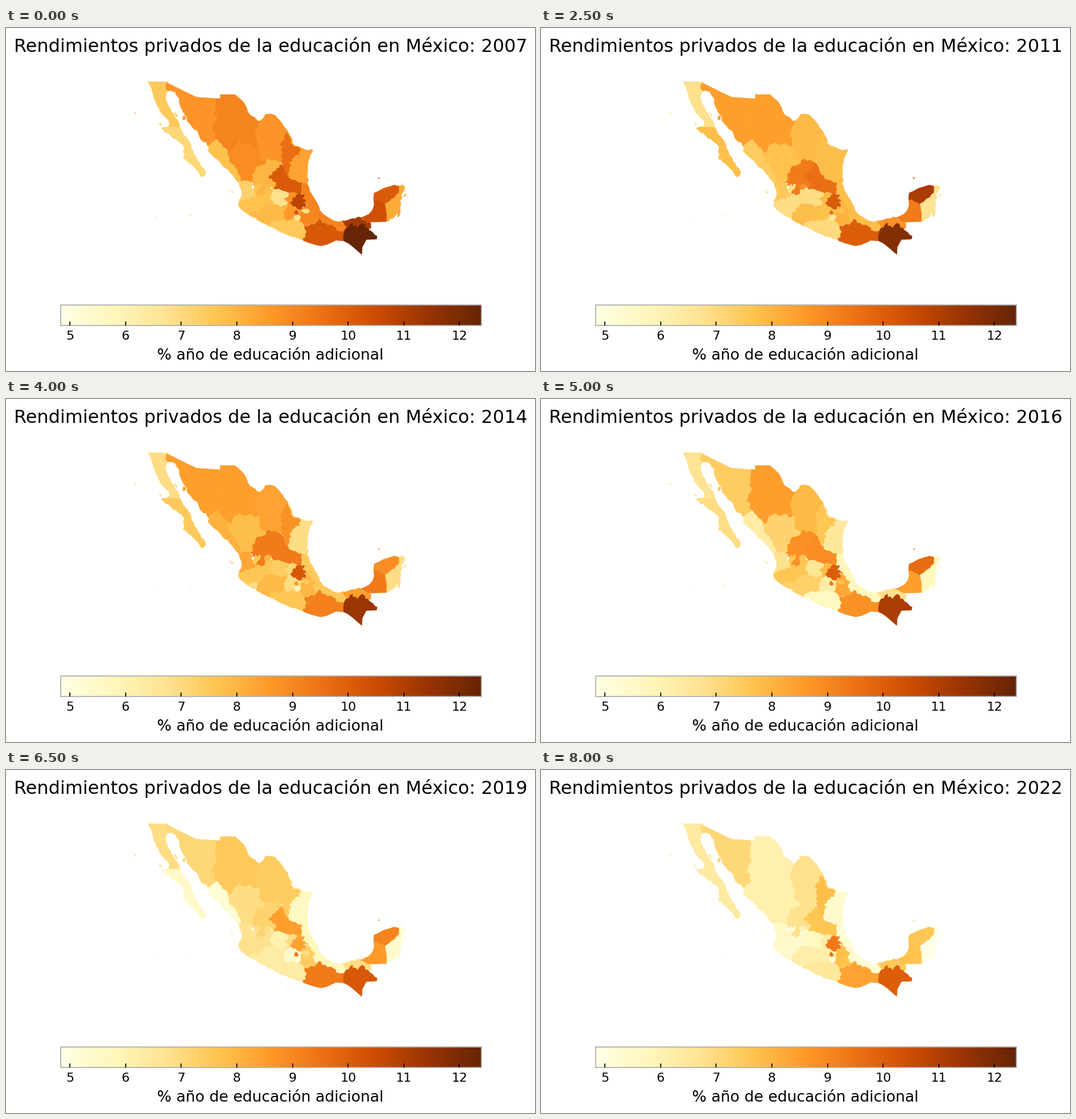
A matplotlib script that plays this animation: 928 by 603 pixels, repeating every 8500 ms.

```python
import numpy as np
import matplotlib
import matplotlib.pyplot as plt
from matplotlib.animation import FuncAnimation
from matplotlib.patches import Polygon, Rectangle

W, H, DPI = 928, 603, 64
VMIN, VMAX = 4.83, 12.39
YEARS = [2007, 2009, 2011, 2014, 2016, 2019, 2022]
CMAP = matplotlib.colormaps["YlOrBr"]

plt.rcParams["font.family"] = "DejaVu Sans"
fig = plt.figure(figsize=(W / DPI, H / DPI), dpi=DPI, facecolor="white")
ax = fig.add_axes([0, 0, 1, 1])
ax.axis("off")

states = []


def px(size):
    return size * 72 / DPI


def state(values, *rings):
    """Add a state: its rate in each of YEARS and its rings as x, y pairs."""
    parts = []
    for ring in rings:
        part = Polygon(np.reshape(ring, (-1, 2)), closed=True, lw=px(0.7),
                       joinstyle="round")
        parts.append(ax.add_patch(part))
    states.append((values, parts))


def dot(x, y, w, h):
    return [x - w, y, x, y - h, x + w, y, x, y + h]


# Baja California
state([7.5, 7.3, 6.8, 6.9, 6.7, 6.9, 6.4],
      [249.5, 94.5, 284, 94.5, 284, 97, 281, 99, 280, 105, 283, 111, 281, 116,
       279.5, 123, 282, 130, 285, 137, 288, 141, 290, 147, 294, 152, 297, 158,
       301, 162, 304, 168, 305, 175, 285, 173.5, 287, 168, 285, 162, 279, 157,
       274, 151, 270, 146, 268, 140, 264, 134, 262, 128, 259, 122, 258, 115,
       256, 111, 255, 105, 252, 100],
      [295, 148, 298, 150, 301, 156, 298, 155],
      [269.5, 166, 272, 169, 273, 171, 270, 170],
      dot(227, 150, 0.8, 1.8))

# Baja California Sur
state([7.1, 6.8, 7.8, 7.5, 6.9, 5.5, 6.4],
      [272, 176, 278, 174, 285, 174, 305, 175, 309, 182, 311, 187, 317, 193,
       322, 200, 325, 207, 325, 212, 329, 217, 330, 223, 334, 227, 337, 234,
       341, 238, 342, 243, 347, 247, 350, 253, 350, 257, 345, 262, 341, 260,
       339, 255, 335, 250, 329, 244, 324, 239, 318, 235, 316, 231, 311, 230,
       313, 222, 311, 216, 313, 210, 309, 204, 303, 200, 298, 195, 293, 194,
       289, 189, 285, 185, 280, 184, 276, 179])

# Sonora
state([8.7, 8.0, 8.5, 8.5, 7.4, 7.1, 7.1],
      [281, 98, 284, 97, 310, 110, 334, 121.5, 368, 124, 371, 140, 369, 160,
       366, 178, 370, 190, 370, 197, 362, 201, 357, 206, 353, 206, 352, 201,
       346, 200, 341, 195, 338, 187, 336, 181, 329, 177, 324, 170, 318, 164,
       317, 156, 312, 150, 309, 144, 306, 138, 304, 131, 304, 124, 299, 118,
       297, 113, 292, 111, 287, 110, 284, 111, 280, 106],
      [312, 154, 315, 156, 315, 160, 311, 162, 310, 158])

# Coahuila
state([8.7, 8.9, 7.9, 8.4, 7.9, 7.4, 6.8],
      [445, 164, 452, 158, 455, 152, 463, 151, 471, 153, 477, 159, 484, 167,
       488, 174, 494, 181, 496, 186, 493, 195, 487, 205, 486, 220, 486, 233,
       478, 238, 467, 236, 458, 236, 450, 234, 445, 229, 442, 222, 443, 212,
       436, 200, 435, 185, 438, 172])

# Durango
state([8.9, 8.4, 7.7, 7.8, 7.2, 6.9, 6.1],
      [389, 217, 395, 212, 402, 203, 437, 201, 441, 204, 445, 209, 443, 213,
       446, 218, 443, 222, 446, 228, 450, 231, 457, 234, 456, 240, 449, 245,
       441, 248, 438, 256, 435, 264, 432, 270, 428, 272, 420, 270, 411, 272,
       408, 262, 404, 256, 403, 249, 397, 243, 391, 237, 389, 230, 387, 222])

# Chihuahua
state([9.1, 8.9, 8.5, 8.5, 8.5, 7.5, 6.1],
      [368, 124, 376, 124, 376, 117, 402, 117, 406, 121, 412, 126, 417, 131,
       422, 140, 424, 147, 428, 153, 437, 158, 441, 163, 446, 164, 442, 169,
       440, 176, 437, 182, 437, 189, 440, 195, 440, 200, 442, 204, 438, 208,
       433, 206, 432, 202, 425, 202, 422, 205, 415, 204, 410, 201, 405, 204,
       402, 204, 398, 209, 397, 214, 395, 219, 389, 217, 386, 212, 380, 209,
       378, 204, 373, 201, 370, 196, 366, 191, 368, 185, 365, 181, 361, 179,
       363, 174, 364, 169, 369, 163, 370, 157, 366, 152, 368, 146, 367, 138,
       369, 132])

# Sinaloa
state([7.7, 6.8, 7.4, 8.1, 6.3, 5.3, 6.1],
      [353, 207, 358, 206, 362, 201, 367, 200, 368, 196, 372, 197, 374, 202,
       378, 204, 380, 209, 386, 212, 389, 217, 388, 222, 391, 226, 391, 234,
       394, 238, 400, 241, 402, 246, 406, 250, 406, 256, 410, 260, 412, 265,
       411, 271, 406, 270, 402, 265, 398, 259, 393, 254, 389, 248, 382, 245,
       377, 238, 371, 231, 365, 227, 359, 221, 354, 215, 357, 211])

# Jalisco
state([7.7, 7.4, 6.9, 7.6, 7.6, 6.8, 5.4],
      [436, 277, 438, 271, 446, 270, 449, 276, 444, 287, 448, 292, 453, 282,
       464, 282, 469, 284, 468, 290, 467, 300, 471, 309, 463, 311, 456, 313,
       451, 318, 448, 324, 441, 327, 436, 333, 430, 331, 424, 327, 417, 322,
       412, 318, 408, 312, 408, 307, 413, 303, 421, 297, 430, 294, 437, 291,
       434, 285])

# Nayarit
state([7.3, 8.2, 7.5, 8.3, 6.8, 6.7, 5.6],
      [408, 269, 411, 271, 417, 268, 424, 269, 429, 271, 432, 277, 430, 281,
       434, 284, 433, 288, 437, 291, 437, 296, 431, 297, 427, 300, 421, 299,
       417, 302, 412, 305, 408, 304, 412, 299, 414, 293, 413, 285, 410, 279],
      dot(393.5, 285.5, 1, 0.8), dot(396.5, 288.5, 1, 1.2))

# Zacatecas
state([8.0, 8.1, 9.3, 9.3, 8.8, 7.2, 6.8],
      [457, 233, 461, 230, 466, 234, 472, 232, 478, 236, 484, 238, 483, 244,
       478, 250, 471, 256, 465, 262, 474, 270, 475, 278, 470, 284, 466, 279,
       460, 278, 454, 279, 454, 285, 454, 291, 447, 294, 444, 290, 439, 292,
       441, 286, 446, 282, 448, 275, 444, 273, 441, 277, 438, 272, 436, 277,
       432, 276, 434, 273, 429, 271, 433, 268, 433, 262, 432, 257, 437, 254,
       438, 247, 441, 243, 448, 242, 455, 239])

# Aguascalientes
state([7.9, 8.1, 8.8, 8.0, 7.6, 6.9, 5.9],
      [453, 279, 456, 275, 461, 274, 466, 277, 464, 281, 459, 284, 454, 283])

# Tamaulipas
state([8.4, 8.3, 7.8, 6.9, 6.5, 5.7, 5.4],
      [495, 184, 499, 190, 502, 196, 502, 202, 507, 207, 515, 209, 525, 214,
       532, 215, 537, 213, 538, 216, 534, 223, 531, 232, 529, 242, 529, 252,
       528, 262, 531, 268, 528, 273, 521, 273, 513, 273, 500, 270, 493, 262,
       492, 250, 496, 236, 506, 222, 512, 214, 503, 209, 497, 197])

# Nuevo Leon
state([9.6, 8.7, 7.8, 8.8, 7.6, 7.4, 7.8],
      [490, 187, 494, 185, 497, 192, 500, 196, 500, 203, 505, 209, 513, 209,
       517, 214, 513, 218, 515, 222, 508, 223, 506, 227, 502, 229, 501, 234,
       496, 236, 500, 242, 496, 246, 497, 251, 494, 258, 489, 257, 488, 250,
       485, 246, 486, 240, 483, 236, 486, 230, 482, 226, 486, 221, 482, 214,
       486, 210, 481, 206, 483, 200, 489, 196, 488, 191])

# San Luis Potosi
state([10.1, 9.8, 9.6, 9.3, 8.9, 8.5, 7.6],
      [484, 240, 486, 244, 488, 250, 491, 258, 495, 259, 496, 264, 502, 267,
       508, 268, 513, 272, 519, 272, 518, 278, 521, 281, 518, 286, 519, 291,
       512, 292, 506, 289, 500, 291, 492, 288, 485, 286, 478, 284, 472, 286,
       470, 281, 474, 277, 474, 271, 468, 269, 467, 265, 461, 264, 462, 260,
       467, 258, 468, 253, 474, 251, 474, 248, 479, 246, 480, 242])

# Veracruz
state([9.1, 8.8, 7.8, 7.5, 5.8, 5.8, 5.3],
      [520, 273, 528, 273, 531, 279, 533, 287, 538, 295, 543, 303, 548, 312,
       551, 321, 557, 328, 565, 333, 575, 339, 584, 341, 592, 338, 594, 344,
       599, 350, 597, 357, 584, 358, 576, 356, 566, 350, 556, 346, 547, 339,
       539, 337, 535, 330, 537, 320, 531, 312, 522, 305, 519, 299, 524, 295,
       518, 291, 520, 285, 518, 279])

# Michoacan
state([7.9, 8.0, 7.8, 7.9, 7.3, 6.3, 6.2],
      [440, 330, 441, 324, 447, 323, 448, 317, 452, 315, 455, 310, 462, 309,
       470, 309, 480, 310, 490, 310, 497, 314, 493, 320, 491, 330, 493, 339,
       483, 342, 473, 343, 467, 344, 461, 348, 454, 344, 447, 341, 439, 336])

# Colima
state([7.9, 7.6, 6.9, 6.9, 7.3, 6.4, 5.5],
      [425, 327, 429, 323, 433, 324, 437, 321, 441, 324, 440, 330, 437, 334,
       430, 331],
      dot(323, 328.5, 1.2, 0.6), dot(264, 332, 0.4, 0.4))

# Guanajuato
state([6.8, 6.7, 6.9, 7.4, 6.6, 6.0, 5.7],
      [471, 284, 478, 283, 484, 286, 491, 288, 498, 291, 497, 296, 492, 298,
       494, 304, 498, 306, 496, 311, 488, 311, 482, 314, 476, 309, 470, 310,
       469, 304, 464, 301, 464, 296, 468, 289])

# Queretaro
state([8.8, 8.3, 7.9, 7.1, 7.9, 6.9, 6.4],
      [497, 291, 503, 288, 507, 290, 512, 292, 510, 297, 504, 302, 501, 309,
       498, 314, 493, 312, 495, 306, 488, 300, 495, 297])

# Guerrero
state([7.5, 8.0, 7.0, 7.6, 5.7, 6.3, 6.5],
      [460, 348, 464, 342, 470, 341, 473, 338, 480, 340, 486, 338, 492, 337,
       498, 333, 505, 334, 514, 337, 522, 343, 525, 347, 525, 353, 528, 358,
       527, 366, 524, 374, 516, 371, 508, 368, 499, 366, 491, 362, 482, 359,
       474, 354, 467, 350])

# Puebla
state([9.0, 8.3, 8.1, 8.0, 8.3, 7.4, 7.7],
      [525, 304, 529, 304, 530, 309, 535, 313, 534, 317, 538, 319, 542, 322,
       539, 326, 537, 330, 541, 334, 541, 338, 547, 340, 545, 345, 538, 346,
       533, 344, 528, 348, 523, 347, 520, 342, 515, 339, 516, 332, 516, 324,
       518, 317, 525, 314, 528, 309])

# Estado de Mexico
state([8.6, 7.5, 7.7, 6.9, 6.3, 5.4, 6.2],
      [498, 312, 504, 313, 510, 316, 517, 317, 519, 321, 516, 325, 518, 330,
       512, 330, 506, 331, 503, 335, 497, 337, 492, 339, 488, 333, 489, 328,
       487, 324, 491, 321, 491, 317])

# Hidalgo
state([10.8, 10.2, 10.1, 10.2, 10.0, 8.4, 9.4],
      [509, 294, 514, 291, 518, 293, 524, 293, 522, 297, 519, 300, 525, 302,
       526, 305, 521, 306, 526, 309, 525, 314, 520, 314, 517, 319, 512, 318,
       508, 314, 503, 313, 499, 308, 503, 304, 503, 299, 508, 298])

# Tlaxcala
state([6.9, 7.2, 7.7, 7.5, 7.7, 6.9, 7.8],
      [518, 321, 523, 318, 529, 318, 533, 322, 529, 326, 523, 325])

# Morelos
state([6.8, 7.6, 6.4, 6.0, 6.3, 5.3, 5.1],
      [506, 330, 511, 328, 517, 331, 516, 336, 511, 339, 506, 336])

# Ciudad de Mexico
state([10.3, 9.3, 9.4, 8.6, 9.5, 9.5, 9.6],
      [509, 320, 511, 322, 513, 326, 510, 328, 506, 326, 507, 322])

# Oaxaca
state([10.2, 9.8, 10.0, 9.2, 8.8, 9.3, 8.4],
      [549, 336, 553, 338, 554, 343, 560, 343, 564, 347, 570, 346, 574, 349,
       578, 351, 579, 356, 586, 358, 594, 357, 592, 365, 592, 374, 586, 374,
       579, 373, 571, 377, 562, 381, 552, 383, 543, 381, 533, 378, 522, 374,
       521, 370, 526, 368, 525, 363, 528, 358, 524, 353, 524, 348, 529, 349,
       534, 345, 541, 346, 546, 341])

# Tabasco
state([11.2, 9.6, 8.8, 8.5, 6.8, 6.9, 7.5],
      [591, 340, 599, 338, 607, 335, 613, 335, 618, 332, 622, 333, 625, 337,
       630, 338, 632, 341, 638, 341, 640, 344, 640, 352, 633, 353, 626, 351,
       617, 354, 607, 350, 600, 352, 595, 347])

# Chiapas
state([12.39, 11.8, 11.8, 11.4, 11.1, 10.2, 10.0],
      [594, 356, 597, 351, 601, 351, 604, 345, 608, 343, 608, 348, 613, 348,
       617, 352, 620, 347, 625, 343, 629, 346, 630, 351, 635, 352, 638, 356,
       643, 359, 647, 364, 651, 366, 650, 371, 632, 372, 625, 385, 624, 398,
       616, 391, 608, 384, 600, 378, 592, 374, 592, 365])

# Campeche
state([10.4, 9.2, 9.3, 9.3, 8.5, 8.6, 7.7],
      [645, 302, 652, 300, 668, 302, 667, 314, 668, 325, 668, 340, 650, 341,
       639, 341, 632, 340, 629, 337, 622, 334, 629, 331, 637, 327, 643, 320,
       646, 311])

# Quintana Roo
state([8.2, 7.9, 6.7, 6.9, 5.8, 5.4, 4.85],
      [688, 278, 696, 276, 700, 280, 698, 286, 693, 293, 695, 299, 691, 304,
       693, 309, 691, 315, 692, 322, 690, 331, 687, 332, 687, 324, 682, 331,
       677, 336, 675, 334, 672, 339, 668, 340, 668, 325, 666, 314, 665, 306,
       675, 298, 684, 290],
      [701, 291, 702, 293, 699, 297, 698, 295])

# Yucatan
state([10.1, 10.5, 11.1, 8.9, 9.7, 9.1, 7.6],
      [646, 290, 653, 287, 662, 282, 672, 279, 681, 276, 689, 278, 689, 289,
       684, 293, 682, 297, 676, 300, 671, 305, 664, 309, 660, 306, 655, 305,
       651, 301, 645, 302, 645, 296],
      dot(654, 264, 1, 1.2))

# Colour scale
LEFT, RIGHT, TOP, BOTTOM = 95.5, 833.5, 486.5, 523
ax.imshow(np.linspace(0, 1, 256)[None, :], cmap=CMAP, aspect="auto",
          extent=(LEFT, RIGHT, BOTTOM, TOP), interpolation="nearest")
ax.add_patch(Rectangle((LEFT, TOP), RIGHT - LEFT, BOTTOM - TOP, fill=False,
                       ec="#b0b0b0", lw=px(1.8), zorder=3))
for n in range(5, 13):
    x = LEFT + (n - VMIN) / (VMAX - VMIN) * (RIGHT - LEFT)
    ax.plot([x, x], [BOTTOM - 7, BOTTOM], color="black", lw=px(1.7),
            solid_capstyle="butt", zorder=4)
    ax.text(x, 548.3, str(n), fontsize=px(22.15), ha="center", va="baseline")

ax.text(464, 583, "% año de educación adicional", fontsize=px(26.6),
        ha="center", va="baseline")
title = ax.text(464, 42, "", fontsize=px(31.85), ha="center", va="baseline")
ax.set_xlim(0, W)
ax.set_ylim(H, 0)


def draw(i):
    # The first year is held for two steps.
    year = 2007 + max(0, i - 1)
    title.set_text(f"Rendimientos privados de la educación en México: {year}")
    for values, parts in states:
        rate = np.interp(year, YEARS, values)
        color = CMAP((rate - VMIN) / (VMAX - VMIN))
        for part in parts:
            part.set_facecolor(color)
            part.set_edgecolor(color)


anim = FuncAnimation(fig, draw, frames=17, interval=500,
                     init_func=lambda: draw(0), repeat=True, repeat_delay=0,
                     blit=False)
plt.show()
```
